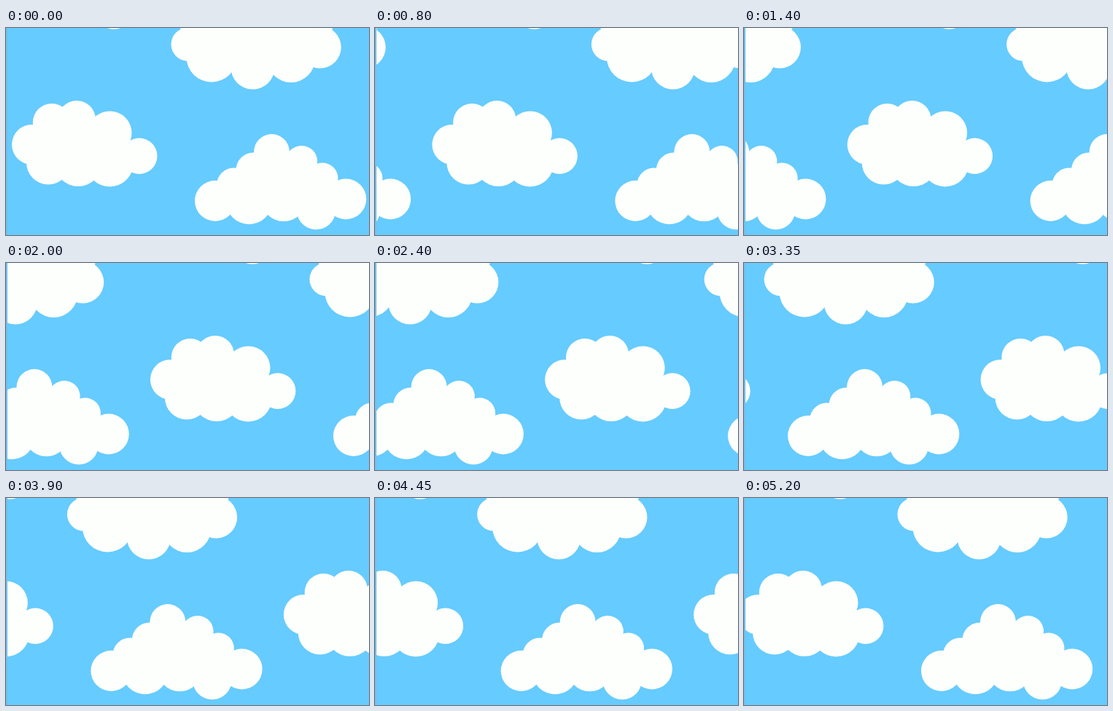
Recreate the animation shown at these times as an HTML page with a canvas. Size 498 by 285 pixels, loop 5250 ms.

```html
<!DOCTYPE html>
<html lang="en">
<head>
<meta charset="utf-8">
<title>Drifting clouds</title>
<style>
  html, body { margin: 0; width: 100%; height: 100%; overflow: hidden; background: #66cbfe; }
  canvas { display: block; }
</style>
</head>
<body>
<canvas id="sky" width="498" height="285"></canvas>
<script>
const W = 498, H = 285;
const LOOP = 5250, TICK = 50, TICKS = LOOP / TICK;
const STEPS = 72;      // cloud moves per loop
const STEP_PX = 7.035; // distance of one move
const SPAN = 515.5;    // width after which the sky repeats

const ctx = document.getElementById('sky').getContext('2d');

const puff = (x, y, r) => ({ x, y, r });

// A cloud is a ring of round puffs, clockwise, with the middle filled in.
function cloud(...puffs) {
  const path = new Path2D();
  for (const { x, y } of puffs) path.lineTo(x, y);
  path.closePath();
  for (const { x, y, r } of puffs) {
    path.moveTo(x + r, y);
    path.arc(x, y, r, 0, 2 * Math.PI);
  }
  return path;
}

const round = cloud(
  puff(35.5, 160.5, 27.5), puff(62.8, 130, 26), puff(97, 126, 26),
  puff(142.5, 144.5, 30), puff(182.8, 176.3, 24.7),
  puff(142.3, 186, 32.5), puff(99, 185, 33), puff(58, 185.5, 30)
);
const pyramid = cloud(
  puff(287, 238, 28), puff(312.5, 216, 23.5), puff(339.5, 195.5, 24),
  puff(364.5, 170.5, 24.4), puff(405.5, 183.7, 21.7), puff(434, 207, 21.5),
  puff(466.3, 235.5, 28), puff(425.5, 251, 26.6),
  puff(381, 235.5, 30.8), puff(333.5, 238.5, 31.7)
);
const wide = cloud(
  puff(249.5, 22.5, 23), puff(271, -8, 33), puff(415, -8, 34),
  puff(430.8, 26.5, 29), puff(391, 42, 33),
  puff(338.5, 54.5, 30), puff(282, 40, 34.5)
);
const tip = cloud(puff(148, -26, 27.6));

function drawClouds(x) {
  ctx.save();
  ctx.translate(x, 0);
  for (const shape of [round, pyramid, wide, tip]) ctx.fill(shape);
  ctx.restore();
}

function draw(time) {
  const tick = Math.floor((time % LOOP) / TICK);
  const x = Math.floor(tick * STEPS / TICKS) * STEP_PX;

  ctx.fillStyle = '#66cbfe';
  ctx.fillRect(0, 0, W, H);
  ctx.fillStyle = '#fdfffc';
  drawClouds(x);
  drawClouds(x - SPAN);

  // fixed edge strip
  ctx.fillStyle = '#74bfe8';
  ctx.fillRect(0, 0, 2, H);
}

let start;
function loop(now) {
  if (start === undefined) start = now;
  draw(Math.max(0, now - start));
  requestAnimationFrame(loop);
}
draw(0);
requestAnimationFrame(loop);
</script>
</body>
</html>
```
